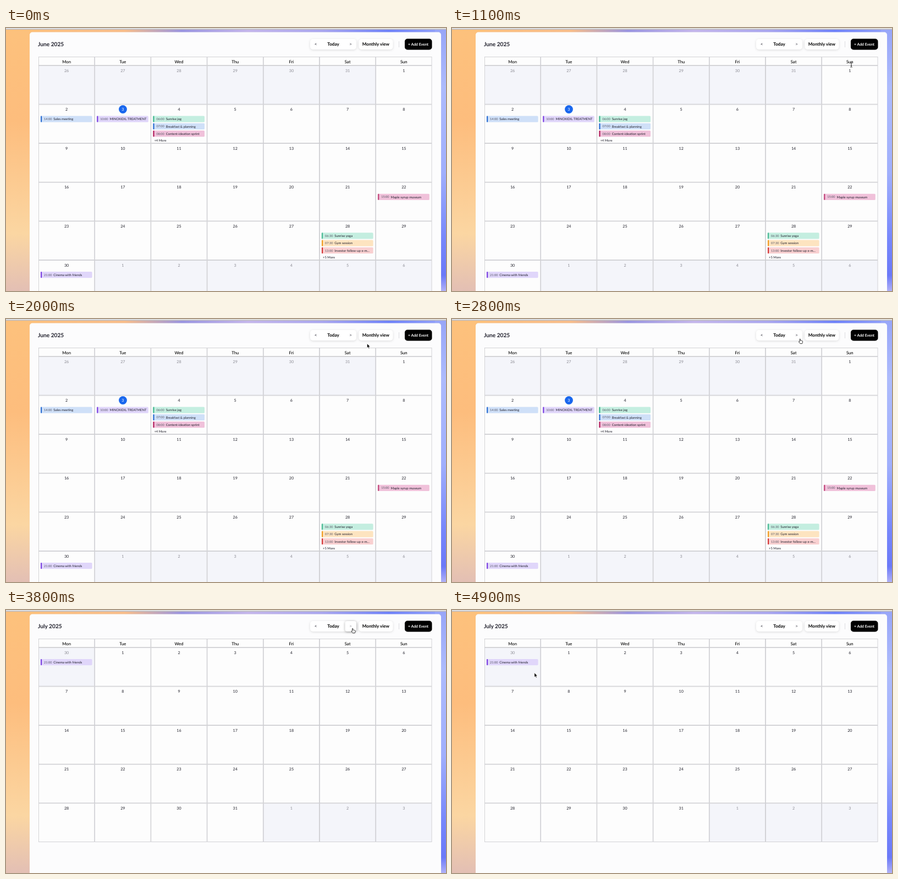
These frames come from a looping animation (800 by 477 pixels, 5 s). An HTML page:

```html
<!DOCTYPE html>
<html lang="en">
<head>
<meta charset="utf-8">
<title>Calendar</title>
<style>
  html, body { margin: 0; width: 100%; height: 100%; overflow: hidden; }
  svg { display: block; width: 800px; height: 477px; }
  text { font-family: Lato, "Open Sans", sans-serif; text-rendering: geometricPrecision; fill: #1f1f2b; }
  .mid { text-anchor: middle; }
  .bold { font-weight: 700; }
  .cell { stroke: #cbcbcf; stroke-width: .85; }
  .pill { fill: #fff; filter: drop-shadow(0 1px 2px #0002); }
  #hover { filter: drop-shadow(0 1px 2px #0005); }
</style>
</head>
<body>
<svg viewBox="0 0 800 477">
  <defs>
    <linearGradient id="left" x2="0" y2="1">
      <stop stop-color="#fdc17c"/><stop offset=".35" stop-color="#fdbd7d"/>
      <stop offset=".78" stop-color="#fbd6a2"/><stop offset="1" stop-color="#e3bfb4"/>
    </linearGradient>
    <linearGradient id="right" x2="0" y2="1">
      <stop stop-color="#98a6f8"/><stop offset=".22" stop-color="#adbbfc"/>
      <stop offset=".55" stop-color="#a0affc"/><stop offset=".8" stop-color="#7787fb"/>
      <stop offset=".94" stop-color="#6b79f8"/><stop offset="1" stop-color="#b0b1f7"/>
    </linearGradient>
    <linearGradient id="top">
      <stop stop-color="#fdc17c"/><stop offset=".27" stop-color="#f7bd8b"/>
      <stop offset=".4" stop-color="#9a95e0"/><stop offset=".55" stop-color="#c4b6ea"/>
      <stop offset=".72" stop-color="#a9a6ee"/><stop offset=".87" stop-color="#6f82f8"/>
      <stop offset="1" stop-color="#98a6f8"/>
    </linearGradient>
  </defs>
  <path fill="url(#top)" d="M0 0H800V16H0z"/>
  <path fill="url(#left)" d="M0 3H60V477H0z"/>
  <path fill="url(#right)" d="M780 3H800V477H780z"/>
  <path fill="#dededf" d="M0 0H800V2H0z"/>
  <path fill="#b5b3b8" d="M0 2H800V3H0z"/>
  <rect x="43" y="7.5" width="748" height="490" rx="5" fill="#fcfcfd"/>

  <rect class="pill" x="553" y="20" width="84" height="19" rx="5"/>
  <rect class="pill" x="641.5" y="20" width="62" height="19" rx="5"/>
  <rect class="pill" id="hover" x="616.5" y="20" width="20.5" height="19" rx="4"/>
  <path d="M714.5 24V35" stroke="#dcdce0"/>
  <rect x="725" y="19.5" width="49.5" height="20" rx="5"/>
  <text id="title" class="bold" x="58" y="33" font-size="10.2"></text>
  <g class="mid bold" font-size="8.1">
    <text x="563" y="32" font-weight="400">&lt;</text>
    <text x="595" y="32.2" style="fill:#000">Today</text>
    <text id="next" x="626.7" y="32" font-weight="400">&gt;</text>
    <text x="672.4" y="32.2" style="fill:#000">Monthly view</text>
    <text x="749.6" y="31.8" font-size="6.9" style="fill:#fff">+ Add Event</text>
  </g>

  <g id="head"></g>
  <g id="june"></g>
  <g id="july"></g>

  <g id="cursor">
    <path id="arrow" d="M0 0V8L1.8 6.4 3.1 9.3 4.5 8.7 3.2 5.9H5.6z" stroke="#fff" stroke-width=".7"/>
    <path id="beam" d="M-1.8 -4.2Q0 -4.2 0 -3Q0 -4.2 1.8 -4.2M0 -3V3M-1.8 4.2Q0 4.2 0 3Q0 4.2 1.8 4.2M-1 1H1" fill="none" stroke="#222" stroke-width=".9"/>
    <path id="hand" d="M-.7 .6Q0 -.5 .8 .6V3.2Q1.6 2.6 2.2 3.4Q3 2.9 3.5 3.7Q4.4 3.3 4.8 4.2V6.2L4 8.6H.2L-2.2 5.5Q-2.3 4.3 -.7 5.2z" fill="#fff" stroke="#111" stroke-width=".8"/>
  </g>
</svg>
<script>
const $ = id => document.getElementById(id);
const X0 = 59, Y0 = 67.9, W = 102.2, H = 70.6;
const PALETTE = {
  blue: ['#cfe0f8', '#2d6fd2'], purple: ['#e0d6fa', '#7c42e2'], green: ['#c4eee0', '#20a87b'],
  pink: ['#f0c1da', '#b3205d'], orange: ['#fde4c0', '#f09b20'], red: ['#f9d0d1', '#d43536']
};

const text = (x, y, size, label, extra = '') =>
  `<text x="${x}" y="${y}" font-size="${size}" ${extra}>${label}</text>`;
const box = (x, y, w, h, fill) =>
  `<rect class="cell" x="${x + .4}" y="${y + .4}" width="${w - .8}" height="${h - .8}" fill="${fill}"/>`;

function eventBar(x, y, [time, label, color, hatched]) {
  const [fill, edge] = PALETTE[color];
  const hatch = hatched ? `<path d="M${x + 5.6} ${y + 1}v10" stroke="${fill}" stroke-width="1.2" stroke-dasharray="1 1.2"/>` : '';
  return `<rect x="${x + 4}" y="${y}" width="93.6" height="11.3" rx="1.6" fill="${fill}"/>
    <rect x="${x + 4}" y="${y}" width="2.2" height="11.3" rx="1" fill="${edge}"/>${hatch}` +
    text(x + 10, y + 7.7, 5.6, time, 'style="fill:#555564"') + text(x + 27.3, y + 7.8, 5.95, label);
}

// offset: day number of the first cell, counted from 1 for the first of the month
function month(rows, offset, length, previous, events, today) {
  let out = '';
  for (let i = 0; i < rows * 7; i++) {
    const x = X0 + i % 7 * W, y = Y0 + Math.floor(i / 7) * H;
    const day = offset + i, inside = day > 0 && day <= length;
    const shown = day < 1 ? previous + day : inside ? day : day - length;
    out += box(x, y, W, H, inside ? '#fdfdfd' : '#f4f5fa');
    if (day === today) out += `<circle cx="${x + W / 2 + .2}" cy="${y + 9}" r="7.4" fill="#1967ee"/>`;
    const color = day === today ? '#fff' : inside ? '#22222c' : '#8b8b93';
    out += text(x + W / 2, y + 11.6, 7.2, shown, `class="mid" style="fill:${color}"`);
    const { list = [], more } = events[day] || {};
    list.forEach((e, n) => out += eventBar(x, y + 21 + n * 13.25, e));
    if (more) out += text(x + 6, y + 67.7, 5.9, `+${more} More`);
  }
  return out;
}

$('head').innerHTML = ['Mon', 'Tue', 'Wed', 'Thu', 'Fri', 'Sat', 'Sun'].map((name, i) =>
  box(X0 + i * W, 52, W, 16, '#fdfdfd') +
  text(X0 + (i + .5) * W, 64.3, 7.7, name, 'class="mid" font-weight="500" style="fill:#000"')).join('');

const cinema = ['21:00', 'Cinema with friends', 'purple'];
$('june').innerHTML = month(6, -5, 30, 31, {
  2: { list: [['14:00', 'Sales meeting', 'blue']] },
  3: { list: [['10:00', 'MINOXIDIL TREATMENT', 'purple']] },
  4: { more: 4, list: [['06:00', 'Sunrise jog', 'green', true], ['07:00', 'Breakfast &amp; planning', 'blue'],
    ['08:00', 'Content-ideation sprint', 'pink']] },
  22: { list: [['15:00', 'Maple syrup museum', 'pink', true]] },
  28: { more: 5, list: [['06:30', 'Sunrise yoga', 'green', true], ['07:30', 'Gym session', 'orange'],
    ['13:00', 'Investor follow-up e-m...', 'red']] },
  30: { list: [cinema] }
}, 3);
$('july').innerHTML = month(5, 0, 31, 30, { 0: { list: [cinema] } });

// time, x, y of the pointer tip
const PATH = [
  [700, 202, 208.5], [1100, 726, 67], [1400, 726, 67], [2000, 656.5, 44.5],
  [2500, 646, 38], [2800, 632.7, 36], [3200, 630.2, 33.2], [4200, 630.2, 33.2], [4800, 149.8, 113.8]
];

function pointer(t) {
  const i = PATH.findIndex(p => p[0] > t);
  if (i < 1) return i ? PATH[PATH.length - 1] : PATH[0];
  const a = PATH[i - 1], b = PATH[i];
  const u = (t - a[0]) / (b[0] - a[0]), k = u * u * (3 - 2 * u);
  return a.map((v, n) => v + (b[n] - v) * k);
}

const show = (id, on) => $(id).style.display = on ? '' : 'none';

function draw(now) {
  const t = Math.floor(now % 5000 / 100) * 100;
  const july = t >= 3500, hovered = t >= 3000 && t < 4300;
  show('june', !july);
  show('july', july);
  show('hover', hovered);
  $('title').textContent = july ? 'July 2025' : 'June 2025';
  $('next').style.fill = hovered ? '#9a9aa2' : '#44444e';

  const [, x, y] = pointer(t);
  const beam = t >= 1100 && t < 1500, hand = t >= 2500 && t < 4300;
  show('cursor', t >= 500);
  show('beam', beam);
  show('hand', hand);
  show('arrow', !beam && !hand);
  $('cursor').setAttribute('transform', `translate(${x} ${y})`);
  requestAnimationFrame(() => draw(performance.now()));
}
draw(performance.now());
</script>
</body>
</html>
```
